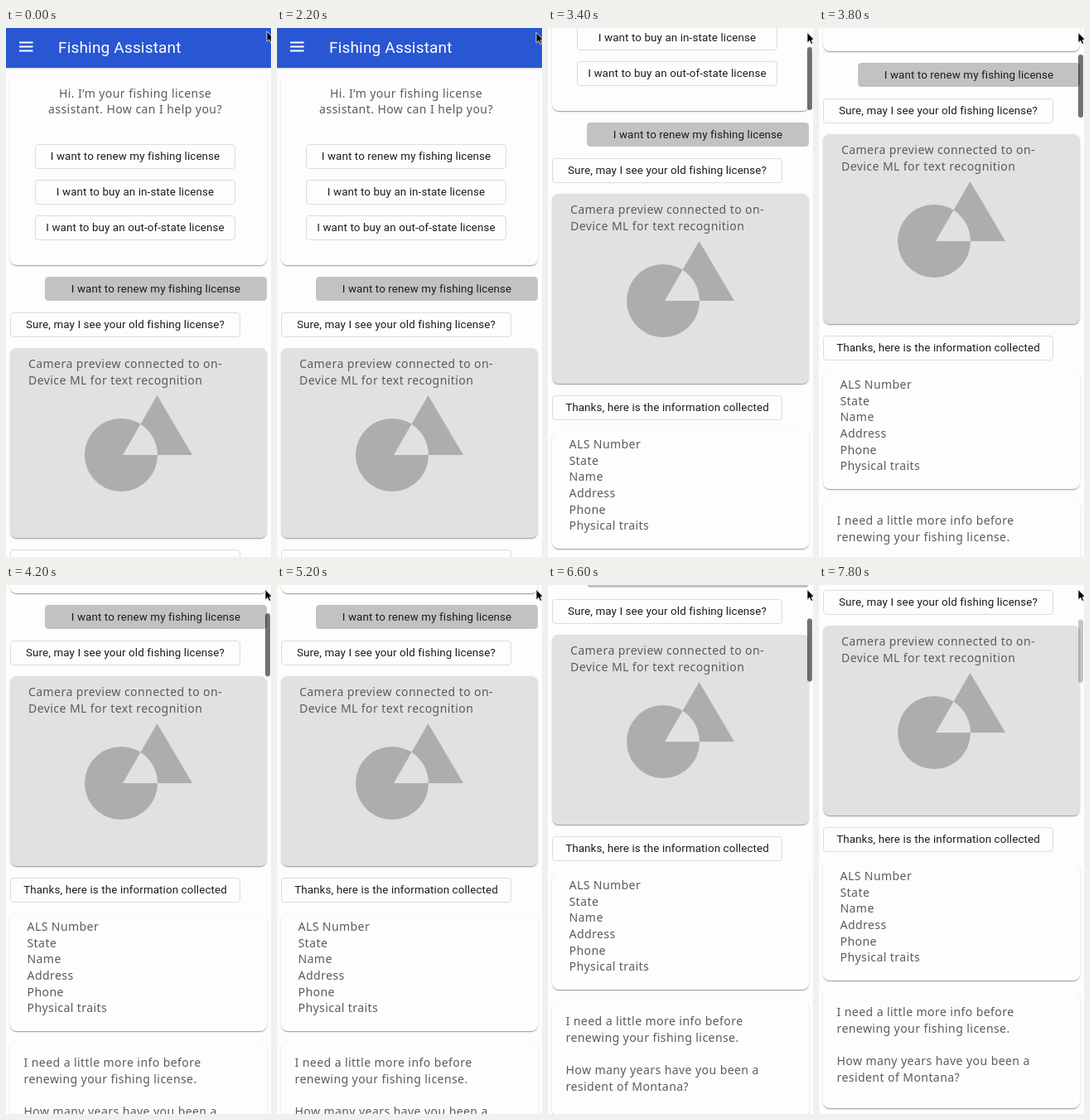
These frames come from a looping animation (320x638 px, 8 s). An HTML page:

```html
<!DOCTYPE html>
<html lang="en">
<head>
<meta charset="utf-8">
<title>Fishing Assistant</title>
<style>
@property --y { syntax: '<number>'; inherits: true; initial-value: 0; }

html, body { margin: 0; width: 100%; height: 100%; overflow: hidden; background: #fefcff; }
.stage {
  position: relative; width: 320px; height: 638px; overflow: hidden;
  background: #fefcff;
  animation: scroll 8s -5ms step-end infinite;
}
.stage div, .stage svg { position: absolute; box-sizing: border-box; }
.page { inset: 0; transform: translateY(calc(var(--y) * -1px)); }

header {
  position: absolute; left: 0; top: 0; width: 320px; height: 47.5px;
  background: #2956d3; color: #fff; box-shadow: 0 1px 2px rgba(0, 0, 0, .2);
  font: 19px/47px Roboto, sans-serif; letter-spacing: .18px; text-indent: 63px;
}

.card {
  left: 5px; width: 310px; border-radius: 8px; background: #fefcff;
  box-shadow: 0 2px 1px -1px rgba(0, 0, 0, .2), 0 1px 1px rgba(0, 0, 0, .14), 0 1px 3px rgba(0, 0, 0, .12);
  color: #5b5a5d; font: 14px/19.6px 'Noto Sans', sans-serif; letter-spacing: .03125em;
  white-space: pre;
}
.hello { top: 57px; height: 229px; padding-top: 11.5px; padding-right: 8px; text-align: center; }
.camera { top: 386px; height: 229px; padding: 9px 0 0 22px; background: #e1e0e2; }
.fields { top: 672px; height: 142px; padding: 6.2px 0 0 20.5px; }
.more { top: 827px; height: 141px; padding: 15.2px 0 0 16.5px; }

.chip {
  height: 30px; border: 1px solid #dddbde; border-radius: 4px; background: #fefcff;
  color: #1c1b1e; font: 13.333px/27px Roboto, sans-serif; letter-spacing: .13px;
  text-align: center; white-space: nowrap;
}
.option { left: 35px; width: 242px; }
.bot { left: 5px; width: 278px; }
.user { left: 47px; width: 268px; height: 29px; border-color: #c2c1c3; background: #c2c1c3; }

.bar {
  left: 313px; top: 0; width: 6px; height: 76px; border-radius: 3px; background: #000;
  transform: translateY(calc(var(--y) * .124px));
  animation: bar 8s -5ms step-end infinite;
}
.cursor { left: 0; top: 0; overflow: visible; animation: drift 8s -5ms step-end infinite; }

@keyframes scroll {
  0% { --y: 0; }
  32.5% { --y: 2; }
  35% { --y: 14; }
  37.5% { --y: 43; }
  40% { --y: 112; }
  42.5% { --y: 186; }
  45% { --y: 232; }
  47.5% { --y: 258; }
  50% { --y: 271; }
  52.5% { --y: 276; }
  77.5% { --y: 296.6; }
  80% { --y: 313; }
  82.5% { --y: 326; }
  85% { --y: 334; }
  87.5%, 100% { --y: 337; }
}
@keyframes bar {
  0% { opacity: 0; }
  32.5% { opacity: .55; }
  65% { opacity: 0; }
  77.5% { opacity: .55; }
  97.5%, 100% { opacity: .22; }
}
@keyframes drift {
  0% { transform: translate(315px, 4px); }
  5% { transform: translate(314.5px, 4.5px); }
  12.5% { transform: translate(314px, 5px); }
  20% { transform: translate(313.5px, 5.5px); }
  27.5%, 100% { transform: translate(313px, 5.5px); }
}
</style>
</head>
<body>
<div class="stage">
  <div class="page">
    <header>Fishing Assistant</header>
    <svg width="40" height="40" style="left:0;top:0">
      <path d="M16 17.5H32.5M16 22.5H32.5M16 27.5H32.5" stroke="#fff" stroke-width="2"/>
    </svg>

    <div class="card hello">Hi. I’m your fishing license
assistant. How can I help you?</div>
    <div class="chip option" style="top:140px">I want to renew my fishing license</div>
    <div class="chip option" style="top:183px">I want to buy an in-state license</div>
    <div class="chip option" style="top:226px">I want to buy an out-of-state license</div>

    <div class="chip user" style="top:300px">I want to renew my fishing license</div>
    <div class="chip bot" style="top:343px">Sure, may I see your old fishing license?</div>

    <div class="card camera">Camera preview connected to on-
Device ML for text recognition</div>
    <svg width="140" height="130" viewBox="90 435 140 130" style="left:90px;top:435px">
      <path fill="#adacae" fill-rule="evenodd"
        d="M95 515a44 44 0 1 1 88 0a44 44 0 1 1-88 0zM182.5 443L225 515H141z"/>
    </svg>

    <div class="chip bot" style="top:629px">Thanks, here is the information collected</div>
    <div class="card fields">ALS Number
State
Name
Address
Phone
Physical traits</div>
    <div class="card more">I need a little more info before
renewing your fishing license.

How many years have you been a
resident of Montana?</div>
  </div>

  <div class="bar"></div>
  <svg class="cursor" width="12" height="18">
    <path d="M0 0V12.4L2.9 9.8L4.8 14.1L6.9 13.2L5 9H8.8Z" stroke="#fff" stroke-width=".8"/>
  </svg>
</div>
</body>
</html>
```
